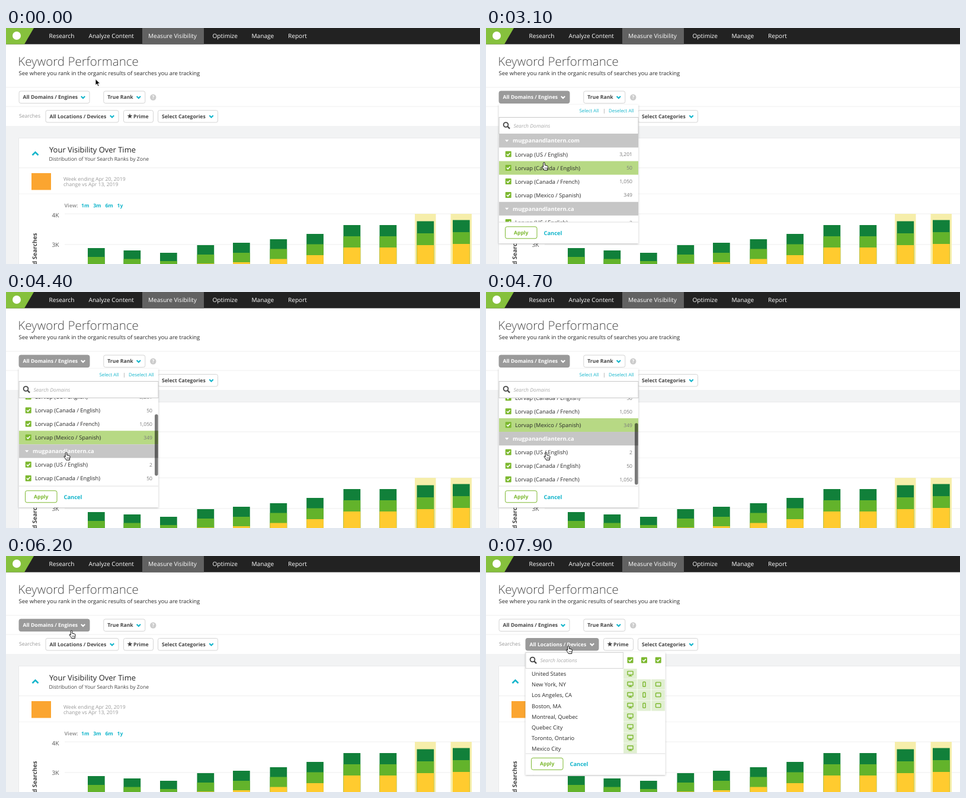
Animation, 800 px wide and 400 px high, one loop 8 s. Source, as an HTML page:

```html
<!DOCTYPE html>
<html lang="en">
<head>
<meta charset="utf-8">
<title>Keyword Performance</title>
<style>
  html, body { margin: 0; width: 100%; height: 100%; overflow: hidden; background: #fff; }
  svg { display: block; width: 800px; height: 400px; }
  text { font-family: "Open Sans", "Noto Sans", sans-serif; text-rendering: geometricPrecision; white-space: pre; }
  .b { font-weight: 700; }
  .l { font-weight: 300; }
  .i { font-style: italic; }
  .pop { filter: drop-shadow(0 1px 1.5px rgba(0, 0, 0, .25)); }
</style>
</head>
<body>
<svg id="stage" viewBox="0 0 800 400"></svg>
<script>
const CYAN = '#12b5cb', GREEN = '#7cb82f', INK = '#2a2a2a', MUTED = '#999';
const SMALL = 8.64, BODY = 9.36, NAV = 10.08;

// cy is the middle of the capitals
const text = (x, cy, s, size, fill = INK, cls = '', more = '') =>
  `<text x="${x}" y="${(cy + size * .36).toFixed(2)}" font-size="${size}" fill="${fill}" class="${cls}" ${more}>${s}</text>`;
const rect = (x, y, w, h, fill, more = '') =>
  `<rect x="${x}" y="${y}" width="${w}" height="${h}" fill="${fill}" ${more}/>`;
const line = (y, x = 0, x2 = 800, color = '#eee') => rect(x, y, x2 - x, 1, color);
const stroke = (d, color, width, more = '') =>
  `<path d="${d}" fill="none" stroke="${color}" stroke-width="${width}" ${more}/>`;
const chevron = (x, y, color) => stroke(`M${x - 3.2} ${y - 1.6}l3.2 3.2 3.2-3.2`, color, 2.1);
const check = (x, y) => rect(x - 5, y - 5, 10, 10, GREEN, 'rx="1"') +
  stroke(`M${x - 2.7} ${y}l2 2.1 3.5-4`, '#fff', 1.6);
const glass = (x, y) => `<circle cx="${x - 1}" cy="${y - 1}" r="3.9" fill="none" stroke="#444" stroke-width="1.8"/>` +
  stroke(`M${x + 2} ${y + 2}l3.6 3.6`, '#444', 2.2);

function button(x, y, w, label, { on = false, star = false } = {}) {
  const ink = on ? '#fff' : '#444';
  let out = rect(x + .5, y + .5, w - 1, 20.5, on ? '#9a9a9a' : '#fff', `rx="3" stroke="${on ? '#9a9a9a' : '#d4d4d4'}"`);
  if (star) {
    const pts = Array.from({ length: 10 }, (_, k) => {
      const a = k * Math.PI / 5, r = k % 2 ? 2 : 4.7;
      return `${(x + 11 + r * Math.sin(a)).toFixed(2)},${(y + 10.5 - r * Math.cos(a)).toFixed(2)}`;
    });
    out += `<polygon points="${pts.join(' ')}" fill="${ink}"/>`;
  } else out += chevron(x + w - 11.5, y + 10.8, on ? '#fff' : CYAN);
  return out + text(x + (star ? 17 : 7), y + 10.5, label, SMALL, ink, 'b');
}

function footer(x, y) {
  return rect(x + .5, y + .5, 53.5, 20, '#fff', `rx="3" stroke="${GREEN}"`) +
    text(x + 15, y + 10.5, 'Apply', SMALL, GREEN, 'b') +
    text(x + 65.5, y + 11, 'Cancel', BODY, CYAN, 'b');
}

function navBar() {
  const items = [[72.5, 'Research'], [139.5, 'Analyze Content'], [240, 'Measure Visibility'],
    [348.5, 'Optimize'], [414.5, 'Manage'], [476, 'Report']];
  return rect(0, 0, 800, 27.5, '#222') + rect(230, 0, 104, 27.5, '#626262') +
    '<path d="M0 0H47L31 27.5H0z" fill="#86c13d"/><circle cx="18" cy="13" r="7" fill="#fff"/>' +
    items.map(([x, s]) => text(x, 13.2, s, NAV, '#fff')).join('');
}

function chart() {
  const xs = [138, 198.5, 260, 322.5, 383, 445.5, 507.2, 569.5, 630.5, 693.5, 754];
  const dark = [373, 377, 381, 368, 364, 358, 349, 334, 334, 327.5, 325.5];
  const mid = [388, 391.5, 395, 384, 381, 374.5, 366.5, 353, 353, 348, 346];
  const low = [400, 400, 400, 399.3, 397, 391.5, 385, 372, 372, 368, 366];
  return line(314.5, 99) + line(366.5, 99) +
    rect(690, 315, 35.5, 85, '#f6eeaa') + rect(750.5, 315, 35.5, 85, '#f6eeaa') +
    xs.map((x, k) => rect(x, dark[k], 28.7, 80, '#11803a') +
      rect(x, mid[k], 28.7, 60, '#63b32b') + rect(x, low[k], 28.7, 40, '#ffcb2f')).join('') +
    text(77.5, 317.5, '4K', NAV, '#555') + text(77.5, 367.8, '3K', NAV, '#555') +
    text(0, 0, 'Ranked Searches', NAV, '#444', 'b', 'text-anchor="end" transform="translate(48 347.5) rotate(-90)"');
}

function page() {
  return rect(0, 0, 800, 400, '#fff') + rect(0, 166, 800, 234, '#f2f3f4') +
    rect(22, 187, 778, 213, '#fff') + stroke('M21.5 400V186.5H800', '#e8e9eb', 1) +
    navBar() +
    text(20.3, 57, 'Keyword Performance', 20.5, '#4a4a4a', 'l') +
    text(21.5, 76.5, 'See where you rank in the organic results of searches you are tracking', 9.43) +
    line(100, 0, 800, '#f0f0f0') + line(132.5, 0, 800, '#f0f0f0') +
    '<circle cx="248.3" cy="117.5" r="5.2" fill="#ccc"/>' +
    text(248.3, 117.5, '?', 8, '#fff', 'b', 'text-anchor="middle"') +
    text(22, 148.7, 'Searches', SMALL, MUTED) +
    button(164.3, 106.5, 71, 'True Rank') +
    button(198, 139, 51, 'Prime', { star: true }) +
    button(256, 139, 102, 'Select Categories') +
    stroke('M44.5 215.5l5-5 5 5', CYAN, 2.6) +
    text(73, 206.5, 'Your Visibility Over Time', 12.96, '#222') +
    text(72.5, 221.5, 'Distribution of Your Search Ranks by Zone', SMALL, '#444') +
    line(236.5, 22) + line(280.5, 22, 800, '#f3f3f3') +
    rect(43, 246, 33, 28.5, '#fba530') +
    text(97, 256.2, 'Week ending Apr 20, 2019', SMALL, MUTED) +
    text(97, 265.2, 'change vs Apr 13, 2019', SMALL, MUTED) +
    text(98.5, 301, 'View:', SMALL, MUTED, 'b') +
    ['1m', '3m', '6m', '1y'].map((s, k) => text(127 + 20.2 * k, 301, s, SMALL, CYAN, 'b')).join('') +
    chart();
}

const ENGINE = 'Lorvap';
const HOST = 'mugpanandlantern';
const ROWS = [[HOST + '.com'], ['US / English', '3,201'], ['Canada / English', '50'], ['Canada / French', '1,050'],
  ['Mexico / Spanish', '349'], [HOST + '.ca'], ['US / English', '2'], ['Canada / English', '50'], ['Canada / French', '1,050']];
const LIST_TOP = 179.5, LIST_END = 329, ROW = 23.05, MAX_SCROLL = 57.7;

function engineRow([name, count], k, hover) {
  const y = LIST_TOP + k * ROW, cy = y + 11.6;
  if (!count) return rect(22, y, 235, ROW, '#c6c6c6') +
    `<path d="M32 ${cy - 1.6}h6.4l-3.2 3.6z" fill="#fff"/>` + text(45, cy, name, BODY, '#fff', 'b');
  return (k === hover ? rect(22, y, 235, ROW, '#b7d984') : '') + check(37.7, cy - .3) +
    text(49, cy, `${ENGINE} (${name})`, BODY) +
    text(247, cy, count, SMALL, '#7c7c7c', '', 'text-anchor="end"');
}

function domainMenu(scroll, hover, bar) {
  return '<g class="pop">' + rect(21.5, 130, 235.7, 235, '#fff') + '</g>' +
    text(157.5, 140.5, 'Select All', 7.92, CYAN) + text(197.5, 140.3, '|', 7.92, '#888') +
    text(207, 140.5, 'Deselect All', 7.92, CYAN) +
    '<g clip-path="url(#list)">' +
    `<g transform="translate(0 ${-scroll})">${ROWS.map((r, k) => engineRow(r, k, hover)).join('')}</g>` +
    rect(251, 181.3 + scroll * .71, 5.6, 104.2, '#000', `rx="2.8" opacity="${bar * .52}"`) + '</g>' +
    rect(22, 151.5, 235, 28, '#fff', 'stroke="#c8c8c8"') + glass(34.5, 165) +
    text(46.5, 165.5, 'Search Domains', SMALL, '#aaa', 'i') +
    line(328.5, 22, 257, '#ddd') + footer(32, 336.3);
}

const ICONS = [
  (x, y) => rect(x - 4.6, y - 4, 9.2, 6, 'none', `stroke="${GREEN}" stroke-width="1.4" rx=".6"`) +
    rect(x - 1, y + 2, 2, 2, GREEN) + rect(x - 3, y + 3.4, 6, 1.3, GREEN),
  (x, y) => rect(x - 2.1, y - 4, 4.2, 7.8, 'none', `stroke="${GREEN}" stroke-width="1.4" rx=".8"`),
  (x, y) => rect(x - 4.2, y - 3.3, 8.4, 6.4, 'none', `stroke="${GREEN}" stroke-width="1.4" rx=".8"`)
];
const PLACES = ['United States', 'New York, NY', 'Los Angeles, CA', 'Boston, MA',
  'Montreal, Quebec', 'Quebec City', 'Toronto, Ontario', 'Mexico City'];

function placeMenu() {
  const cols = [243.5, 267, 290.7];
  return '<g class="pop">' + rect(66.5, 163, 236.2, 208, '#fff') + '</g>' +
    rect(67, 163.5, 164.5, 27, '#fff', 'stroke="#d4d4d4"') + glass(79.5, 176.5) +
    text(91.5, 177, 'Search locations', SMALL, '#aaa', 'i') +
    cols.map(x => check(x, 176.5)).join('') +
    PLACES.map((name, k) => {
      const cy = 200 + 18.05 * k, devices = k > 0 && k < 4 ? 3 : 1;
      return text(77, cy, name, BODY) + cols.slice(0, devices).map((x, d) =>
        rect(x - 11.4, cy - 9, 22.6, 17.4, '#e1efd2') + ICONS[d](x, cy - .6)).join('');
    }).join('') +
    line(334.5, 67, 302.5, '#ddd') + footer(76, 341.8);
}

const ARROW = '<path d="M0 0V10.6l2.5-2.3 1.7 3.9 1.8-.8-1.7-3.8h3.4z" fill="#000" stroke="#fff" stroke-width=".9"/>';
const HAND = '<path d="M-1.3 7.6V1.2a1.3 1.3 0 0 1 2.6 0V4.6l3.6.8q1.9.5 1.7 2.4l-.8 3.3v1.9h-5.6l-1-1.9-2.5-3.4q-.6-1.3.6-1.5.7 0 1.4 1.4z" ' +
  'fill="#fff" stroke="#111" stroke-width="1"/><path d="M1.3 8.4v2.4M3 8.4v2.4M4.6 8.4v2.4" stroke="#111" stroke-width=".6"/>';

// times in ms, then values
const CURSOR = [[800, 151, 86.5], [1300, 125.5, 118.5], [2400, 125.5, 118.5], [3100, 98, 228], [3300, 98, 229.5],
  [4000, 101.5, 271.9], [5100, 101.5, 271.9], [5800, 110.5, 126.5], [6700, 110.5, 126.5], [7500, 139, 152.5]];
const SCROLL = [[4000, 0], [4100, 8], [4300, 26], [4500, 47], [4700, MAX_SCROLL]];
const BAR = [[4000, 0], [4100, 1], [5200, 1], [5500, 0]];

const smooth = u => u * u * (3 - 2 * u);
function at(keys, t, ease = u => u) {
  if (t <= keys[0][0]) return keys[0].slice(1);
  const n = keys.findIndex(k => k[0] >= t);
  if (n < 0) return keys[keys.length - 1].slice(1);
  const a = keys[n - 1], b = keys[n], u = ease((t - a[0]) / (b[0] - a[0]));
  return a.slice(1).map((v, k) => v + (b[k + 1] - v) * u);
}
const inside = (x, y, l, t, r, b) => x >= l && x <= r && y >= t && y <= b;

const stage = document.getElementById('stage');
stage.innerHTML = `<defs><clipPath id="list"><rect x="22" y="${LIST_TOP}" width="236" height="${LIST_END - LIST_TOP}"/></clipPath></defs>` +
  page() + '<g id="live"></g>';
const live = document.getElementById('live');

function draw(t) {
  const [x, y] = at(CURSOR, t, smooth), [scroll] = at(SCROLL, t), [bar] = at(BAR, t);
  const domains = t >= 1600 && t < 6200, places = t >= 7700;
  const over1 = inside(x, y, 22, 107, 142, 128);
  const over2 = !domains && inside(x, y, 67, 139, 190, 161);
  const overList = domains && inside(x, y, 22, LIST_TOP, 257, LIST_END);
  // the highlight stays on its row until scrolling ends
  const scrolling = t >= 4100 && t < 4800;
  const hover = scrolling ? 4 : overList ? Math.floor((y - LIST_TOP + scroll) / ROW) : -1;
  live.innerHTML = button(21.5, 106.5, 120, 'All Domains / Engines', { on: over1 || domains }) +
    button(66.5, 139, 124, 'All Locations / Devices', { on: over2 || places }) +
    (domains ? domainMenu(scroll, hover, bar) : '') + (places ? placeMenu() : '') +
    `<g transform="translate(${x} ${y})">${over1 || over2 || overList ? HAND : ARROW}</g>`;
}

let shown = -1;
function tick() {
  const t = Math.floor(performance.now() % 8000 / 100) * 100;
  if (t !== shown) draw(shown = t);
  requestAnimationFrame(tick);
}
tick();
</script>
</body>
</html>
```
